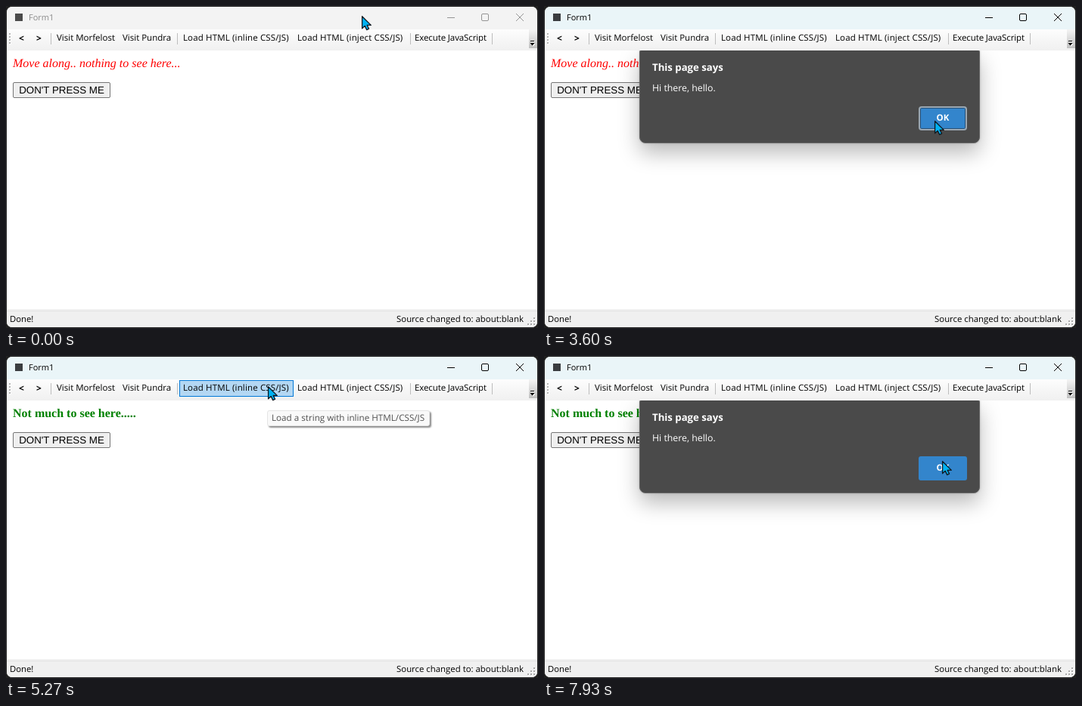
Recreate the animation shown at these times as an HTML page with a canvas. Size 703 px wide and 427 px high, loop 8 s.

```html
<!DOCTYPE html>
<html lang="en">
<head>
<meta charset="utf-8">
<title>Form1</title>
<style>
html, body { margin: 0; width: 100%; height: 100%; overflow: hidden; background: #000; }
#stage {
  position: absolute; left: 0; top: 0; width: 703px; height: 427px; overflow: hidden;
  font: 11.5px/20px "Open Sans", "Noto Sans", sans-serif; color: #000;
  text-rendering: geometricPrecision;
}
#stage * { position: absolute; white-space: pre; box-sizing: border-box; }
#title { left: 30px; top: 6px; font-size: 11px; }
.nav { font-size: 12px; font-weight: 700; }
#page { left: 1px; top: 59px; width: 701px; height: 343px; overflow: hidden; }
#line { left: 8px; top: 9px; font: 16px/18px "Liberation Serif", "Times New Roman", serif; }
#line.old { color: #f00; font-style: italic; }
#line.new { color: #008000; font-weight: 700; }
#press {
  left: 8px; top: 42px; width: 129px; height: 21px; border: 1px solid #767676; border-radius: 2px;
  background: #efefef; text-align: center;
  font: 13.333px/19px "Liberation Sans", Arial, sans-serif;
}
#dialog {
  left: 125px; top: -1px; width: 450px; height: 124px; background: #4a4a4a; color: #fff;
  border: 1px solid #636363; border-radius: 3px 3px 8px 8px;
  box-shadow: 0 13px 28px rgba(0,0,0,.27), 0 0 3px rgba(0,0,0,.2);
}
#head { left: 16px; top: 12px; font-size: 13.2px; font-weight: 700; }
#msg { left: 16px; top: 40px; font-size: 12.35px; }
#ok {
  left: 368px; top: 74px; width: 64px; height: 32px; border-radius: 3px;
  text-align: center; line-height: 32px; font-weight: 700; background: #3385cc;
}
#ok.ring { border: 2px solid #9aa7b2; border-radius: 4px; line-height: 28px; box-shadow: inset 0 0 0 1px #26527a; }
.tip {
  height: 21px; padding: 0 6px 0 5px; background: #f9f9f9; color: #505050; font-size: 11.66px;
  line-height: 19px; border: 1px solid #e5e5e5; border-radius: 3px; box-shadow: 2px 2px 2px rgba(0,0,0,.45);
}
#cursor { left: 0; top: 0; overflow: visible; }
</style>
</head>
<body>
<div id="stage">
  <canvas id="chrome" width="703" height="427" style="left:0;top:0"></canvas>
  <span id="title">Form1</span>
  <span class="nav" style="left:17px;top:33px">&lt;</span>
  <span class="nav" style="left:40px;top:33px">&gt;</span>
  <span style="left:67px;top:33px">Visit Morfelost</span>
  <span style="left:154px;top:33px">Visit Pundra</span>
  <span style="left:234px;top:33px;letter-spacing:.15px">Load HTML (inline CSS/JS)</span>
  <span style="left:385px;top:33px;letter-spacing:.15px">Load HTML (inject CSS/JS)</span>
  <span style="left:540px;top:33px;letter-spacing:-.1px">Execute JavaScript</span>
  <div id="page">
    <span id="line" class="old"></span>
    <div id="press">DON'T PRESS ME</div>
    <div id="dialog">
      <span id="head">This page says</span>
      <span id="msg">Hi there, hello.</span>
      <div id="ok">OK</div>
    </div>
  </div>
  <span style="left:5px;top:406px;font-size:11.3px">Done!</span>
  <span style="left:516px;top:406px;font-size:11.4px">Source changed to: about:blank</span>
  <div class="tip" id="tipLoad" style="left:345px;top:72px">Load a string with inline HTML/CSS/JS</div>
  <div class="tip" id="tipRun" style="left:574px;top:76px">Execute a line of JS on web page</div>
  <svg id="cursor" width="16" height="22">
    <path d="M.6.8V16.8L4.2 13.4 6.7 18.6 9.6 17.2 7.2 12.4H12.3Z" fill="#00b2f2" stroke="#101820" stroke-width="1.3" stroke-linejoin="round"/>
  </svg>
</div>
<script>
const $ = id => document.getElementById(id);
const g = $('chrome').getContext('2d');
const RATE = 15, TICKS = 120;

// tick, x, y
const path = [
  [0, 470, 13], [6, 485, 43], [17, 485, 43], [22, 528, 48], [30, 574, 44], [42, 574, 44],
  [54, 516, 152], [57, 516, 152], [68, 375, 55], [72, 346, 40], [83, 346, 40],
  [91, 491, 45], [96, 572, 48], [102, 572, 48], [115, 526, 139], [120, 526, 139]
];
const items = [
  { x: 229, w: 151, press: [[71, 73]] },
  { x: 380, w: 151, press: [[10, 12]] },
  { x: 535, w: 106, press: [[27, 30], [95, 96]] }
];
const within = (n, [a, b]) => n >= a && n < b;
const fade = (n, from, to, len) => n < from || n >= to ? 0 : Math.min(1, (n - from + 1) / len);

function pointer(n) {
  let i = 1;
  while (path[i][0] < n) i++;
  const [t0, x0, y0] = path[i - 1], [t1, x1, y1] = path[i];
  const k = (n - t0) / (t1 - t0);
  return [Math.round(x0 + (x1 - x0) * k), Math.round(y0 + (y1 - y0) * k)];
}

function rect(color, x, y, w, h) {
  g.fillStyle = color;
  g.fillRect(x, y, w, h);
}

function gradient(y0, y1, top, bottom) {
  const f = g.createLinearGradient(0, y0, 0, y1);
  f.addColorStop(0, top);
  f.addColorStop(1, bottom);
  return f;
}

function drawTitle(active) {
  rect(active ? '#eaf5f8' : '#f3f3f3', 1, 1, 701, 30);
  rect(active ? '#3a3d40' : '#4a4a4a', 12, 10, 10, 10);
  g.strokeStyle = active ? '#000' : '#949494';
  g.lineWidth = 1;
  g.beginPath();
  g.moveTo(583, 15.5); g.lineTo(593, 15.5);
  g.roundRect(628.5, 10.5, 9, 9, 1.5);
  g.moveTo(674, 10); g.lineTo(684, 20);
  g.moveTo(684, 10); g.lineTo(674, 20);
  g.stroke();
}

function drawArrow(color, x, y) {
  rect(color, x, y, 5, 1);
  g.beginPath();
  g.moveTo(x - .5, y + 3); g.lineTo(x + 5.5, y + 3); g.lineTo(x + 2.5, y + 6.5);
  g.fill();
}

function drawToolbar(n, x, y) {
  rect(gradient(31, 59, '#fdfdfd', '#f0f0f0'), 1, 31, 701, 28);
  for (let i = 0; i < 4; i++) {
    rect('#fff', 5, 37 + i * 4, 2, 2);
    rect('#b4b4b4', 4, 36 + i * 4, 2, 2);
  }
  for (const sx of [59, 226, 534, 642]) rect('#bdbdbd', sx, 36, 1, 15);
  rect(gradient(31, 56, '#f4f4f4', '#c0c0c0'), 691, 31, 11, 25);
  drawArrow('#fff', 694, 47);
  drawArrow('#000', 693, 46);

  const idle = within(n, [30, 58]) || n >= 96;
  if (idle || y < 32 || y >= 54) return;
  for (const b of items) {
    if (x < b.x || x >= b.x + b.w) continue;
    const down = b.press.some(p => within(n, p));
    rect('#0078d7', b.x, 32, b.w, 22);
    rect(down ? '#80bceb' : '#b3d7f3', b.x + 1, 33, b.w - 2, 20);
  }
}

function drawStatus() {
  rect('#f0f0f0', 1, 402, 701, 24);
  rect('#e3e3e3', 1, 404, 701, 1);
  for (let r = 0; r < 3; r++)
    for (let c = 0; c <= r; c++) {
      rect('#fff', 698 - c * 4, 414 + r * 4, 2, 2);
      rect('#a8a8a8', 697 - c * 4, 413 + r * 4, 2, 2);
    }
}

function draw(n) {
  const [x, y] = pointer(n), active = n >= 9;
  rect('#202020', 0, 0, 703, 427);
  g.save();
  g.beginPath();
  g.roundRect(1, 1, 701, 425, 7);
  g.clip();
  rect('#fff', 1, 1, 701, 425);
  drawTitle(active);
  drawToolbar(n, x, y);
  drawStatus();
  g.restore();

  $('title').style.color = active ? '#000' : '#8c8c8c';
  const fresh = n >= 75;
  $('line').className = fresh ? 'new' : 'old';
  $('line').textContent = fresh ? 'Not much to see here.....' : 'Move along.. nothing to see here...';

  const open = within(n, [36, 58]) || n >= 101;
  const over = x >= 495 && x < 559 && y >= 133 && y < 165;
  const down = within(n, [56, 58]) || n >= 116;
  $('dialog').style.display = open ? 'block' : 'none';
  $('ok').className = down ? '' : 'ring';
  $('ok').style.background = over ? '#3385cc' : '#006cbe';

  $('tipLoad').style.opacity = fade(n, 77, 94, 3);
  const second = n >= 90;
  $('tipRun').style.top = second ? '77px' : '76px';
  $('tipRun').style.opacity = second ? fade(n, 96, 103, 3) : fade(n, 31, 43, 3);
  $('cursor').style.transform = `translate(${x}px,${y}px)`;
}

let last = -1;
const start = performance.now();
function frame(now) {
  const n = Math.floor((Math.max(0, now - start) + 4) * RATE / 1000) % TICKS;
  if (n !== last) draw(last = n);
  requestAnimationFrame(frame);
}
draw(0);
requestAnimationFrame(frame);
</script>
</body>
</html>
```
